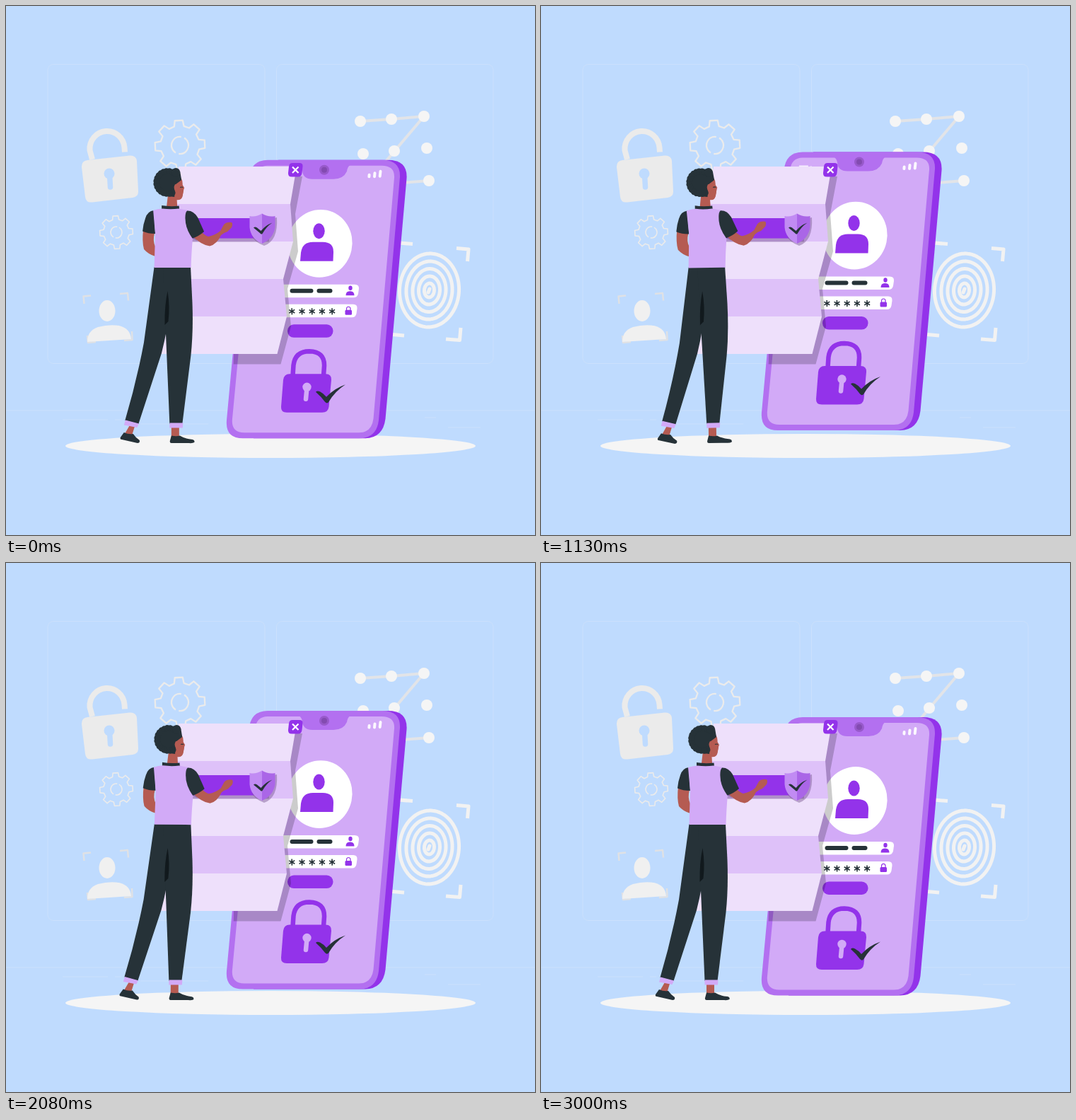
An HTML page for the animation above (3.04 s loop, 748 by 748 pixels).

```html
<!DOCTYPE html>
<html lang="en">
<head>
<meta charset="utf-8">
<title>Secure login</title>
<style>
  html, body { margin: 0; width: 100%; height: 100%; overflow: hidden; background: #bfdbfe; }
  svg { display: block; width: 100vw; height: 100vh; }
  .main { fill: #9333ea; }
  .mid { fill: #b370f0; }
  .pale { fill: #d2aaf7; }
  .dark { fill: #263238; }
  .skin { fill: #b55b52; }
  .white { fill: #fff; }
  .line { fill: none; stroke-linejoin: round; }
</style>
</head>
<body>
<svg viewBox="0 0 748 748">
  <defs>
    <clipPath id="overPhone">
      <path d="M346 212H570V620H319L322 492Z"/>
    </clipPath>
  </defs>

  <!-- backdrop -->
  <g class="line" stroke="#cbe0fc">
    <rect x="59" y="82.500" width="307" height="423" rx="8"/>
    <rect x="382.500" y="82.500" width="306.500" height="423" rx="8"/>
    <path d="M0 572H748M80 585H144M154 585H163M190 591H286M592 582H608M625 596H671"/>
  </g>

  <g id="padlock">
    <path class="line" d="M122 217L118.500 204A24.500 25 0 0 1 167.500 200L168 206.500" stroke="#ebebeb" stroke-width="8"/>
    <path d="M115 218L175 211.500Q184 211 185 219L187 262Q187.500 270 179 271L122 277.500Q113 278.500 112 270L107 228Q106.500 219 115 218Z" fill="#ebebeb"/>
    <circle cx="146" cy="237" r="7.500" fill="#bfdbfe"/>
    <path d="M146.500 238L147.500 256" stroke="#bfdbfe" stroke-width="7.500" stroke-linecap="round"/>
  </g>

  <g id="gears" class="line" stroke="#ebebeb"></g>

  <g id="faceScan">
    <path class="line" d="M110.500 421L109.500 410.500L120 409.500M161 407L172 406L173 416.500M115 466L116 476L127 475M178 460L178.500 472L167 473" stroke="#dfe1e5" stroke-width="2.500"/>
    <ellipse cx="143" cy="431" rx="11.500" ry="15" fill="#f0f0f0"/>
    <path d="M115 475Q115 459 130 454Q145 450 160 452Q176 456 177 471Z" fill="#f0f0f0"/>
  </g>

  <g id="unlockPattern">
    <path class="line" d="M501 163L545 160L591 156L508 254L598 247" stroke="#e2e4e8" stroke-width="4"/>
    <g id="dots" fill="#f5f5f5"></g>
  </g>

  <g id="fingerprint" class="line" stroke="#f2f2f2" stroke-width="5">
    <path d="M637 342.500L654 344L652.500 361M622 471L641.500 472.500L643 455M575 336.500L556 335M563 466L546 464.500"/>
  </g>

  <ellipse cx="374" cy="622" rx="290" ry="17" fill="#f5f5f5"/>

  <g id="phone">
    <path class="main" d="M385 218H540Q568 218 566.500 244L536.500 584Q533 611.500 507 611.500H350Z"/>
    <path class="mid" d="M370 218H532Q558 218 557 242L527 586Q524 611.500 499 611.500H335Q310 611.500 312 586L343.500 244Q346 218 370 218Z"/>
    <path class="pale" d="M370 226H531Q550 226 549 243L519.500 584Q517 603.500 499 603.500H337Q318 603.500 320 584L352 244Q354 226 370 226Z"/>
    <path class="mid" d="M414 225H487Q483 227 482 234Q477 245 463 245H433Q420 245 419 233Q418 227 414 225Z"/>
    <circle cx="450" cy="232" r="7" fill="#985acb"/>
    <circle cx="450" cy="232" r="4" fill="#834bb1"/>
    <g class="line" stroke="#fff" stroke-width="4" stroke-linecap="round" opacity=".93">
      <path d="M513.400 241.500L513.600 239M521 241.500L521.500 236.500M528.700 241L529.500 234"/>
    </g>
    <path class="white" d="M365 237H378L377 243H364ZM380.500 238H383L382 243H380Z" opacity=".8"/>

    <ellipse class="white" cx="444" cy="336" rx="45.500" ry="48" transform="rotate(12 444 336)"/>
    <ellipse class="main" cx="442.500" cy="318.500" rx="8.200" ry="11" />
    <path class="main" d="M416 361L417 349Q419 334 434 334H448Q463 334 463 348L462.500 361Z"/>

    <path class="white" d="M390 394H493Q499.500 394 499 400L498 407Q497 412.500 491 412.500H388Z"/>
    <path class="white" d="M388 422H491Q497 422 496.500 428L495.500 435Q494.500 440.500 489 440.500H386Z"/>
    <path class="line" d="M404.500 403H431.500M442.500 403H458.500" stroke="#263238" stroke-width="6" stroke-linecap="round"/>
    <ellipse class="main" cx="487" cy="399" rx="2.700" ry="3.300"/>
    <path class="main" d="M480.500 409.500Q480.500 403.500 486 403.500Q492.500 403 492.500 409.500Z"/>
    <path id="stars" class="line" stroke="#263238" stroke-width="1.600"/>
    <rect class="main" x="479.500" y="430" width="9.500" height="7" rx="1.500"/>
    <path class="line" d="M481.500 431V428.500A2.700 3 0 0 1 487 428.500V431" stroke="#9333ea" stroke-width="1.200"/>
    <rect class="main" x="398" y="450.500" width="64.500" height="18.500" rx="9"/>

    <path class="line" d="M405.500 523L406.500 508Q409 488.500 429 488.500Q450.500 489 450 509L449 523" stroke="#9333ea" stroke-width="6.500"/>
    <path class="main" d="M401 520.500H452Q460.500 520.500 460 529L456.500 567Q455.500 575 447 575H397Q388.500 575 389 567L392 529Q393 520.500 401 520.500Z"/>
    <circle class="pale" cx="425.500" cy="539" r="6.200"/>
    <path d="M425.500 540L424 556" stroke="#d2aaf7" stroke-width="6.500" stroke-linecap="round"/>
    <path class="dark" d="M438 546Q440 543.500 444 545.500Q449 548 453 553Q464 541 480 535.500Q465 545 456 560.500Q454 563 451 560Q446 553 438 546Z"/>
  </g>

  <!-- folded sheet -->
  <path clip-path="url(#overPhone)" d="M419 241L409 294L413 347L398 400L403 453L388.500 506.500H300V241Z" opacity=".2"/>
  <g id="folds"></g>
  <path d="M262 306H348L372 328V333.500H262Z" fill="#77558f" opacity=".45"/>
  <rect class="main" x="262" y="300" width="100" height="28.500"/>
  <path d="M365 296Q374 301 383 299Q385 332 365 339Q350 333 348 325Z" fill="#77558f" opacity=".45"/>
  <path d="M362 293.500Q353 299 344.500 297V313Q346 329 362 336Z" fill="#c18bf3"/>
  <path d="M362 293.500Q371 299 380.500 297V313Q378 329 362 336Z" fill="#aa66e7"/>
  <path class="dark" d="M350 313.500Q352 311.500 355 313.500L360.500 318Q367 310 376.500 306.500Q368 312 362.500 322Q361 323.500 359 321Z"/>
  <path class="main" d="M405 222H415Q420 222 419.500 227L418.500 236Q418 241.500 413 241.500H404Q398.500 241.500 399 236L400 227Q400.500 222 405 222Z"/>
  <path class="line" d="M405 227.500L413.500 236M413.500 227.500L405 236" stroke="#fff" stroke-width="2.200"/>

  <g id="person">
    <path class="skin" d="M194 316L210 321Q207 332 211 340V354Q201 351 195 344Q192 333 194 316Z"/>
    <path class="dark" d="M209 289Q200 290 197 300Q194 308 193 318.500Q201 322 211 322Z"/>

    <path class="skin" d="M175 593L182 595L178 608L168 605ZM234 595H245V610H234Z"/>
    <path class="dark" d="M167 603Q173 606 180 605Q184 611 189 614Q190 618 186 618L164 613Q161 613 162 610Z"/>
    <path class="dark" d="M234 607.500Q241 609 246 607.500Q253 612 264 613Q267.500 614 266.500 617Q264 618.500 259 618H234Q231.500 618 232 615Z"/>
    <path class="dark" d="M209.500 369H245L231 430Q229 455 220 491L187.500 591L168.500 586Q185 530 195 476Z"/>
    <path class="dark" d="M222 369H261L263.500 420Q265 460 261.500 494L249.500 591H231.500Z"/>
    <path d="M228.500 403Q224 424 224.500 451L229.500 446Q232 425 228.500 403Z" fill="#11191d"/>
    <path class="pale" d="M169 585.500L188 590.500L185.500 596L167 592.500ZM231.500 589.500H250.500L250 596.500H231.500Z"/>

    <path class="skin" d="M229 266L227 283Q235 288 242 283L241.500 274Q249 275 250 266L251 260L252 257L249.500 253Q250 247 247 243L232 246Z"/>
    <path class="skin" d="M241 274Q248 275.500 249.500 268L251 260L249.500 253L240 250Z"/>
    <path d="M246 256.500Q248 255.500 250 256.500" class="line" stroke="#263238" stroke-width="1.200"/>
    <g id="hair" class="dark"></g>
    <path class="skin" d="M239 252Q246 252 244 260Q242 264 239 262Q236 256 239 252Z"/>
    <path class="dark" d="M220 282Q232 284 244.500 282.500L245 288H220Z"/>

    <path class="pale" d="M208 289Q214 287 221 286.500Q233 288 244 286.500L257 289Q262 300 264 327Q262 350 261.500 370H209.500L211 323Z"/>
    <path d="M254 292Q253 312 263 328L270 332L265 318Z" fill="#77558f" opacity=".5"/>
    <path class="skin" d="M262 324L277 320Q282 325 286 326Q296 324 303 318L308 309Q312 305 319 306Q321 308 319 313L313 319Q307 321 304 324Q298 337 288 339.500Q276 338 262 324Z"/>
    <path class="dark" d="M256 289.500Q265 289 271 299L280 319Q272 326 263.500 328.500Q252 313 253.500 296Q254 291 256 289.500Z"/>
  </g>
</svg>

<script>
const $ = id => document.getElementById(id);
const add = (parent, tag, attrs) => {
  const node = document.createElementNS("http://www.w3.org/2000/svg", tag);
  for (const key in attrs) node.setAttribute(key, attrs[key]);
  $(parent).append(node);
};
const polar = (x, y, r, a) => `${x + r * Math.cos(a)} ${y + r * Math.sin(a)}`;

function gear(x, y, r, hole, width, teeth = 8) {
  const pitch = 2 * Math.PI / teeth;
  const points = [];
  for (let i = 0; i < teeth; i++) {
    const a = i * pitch - Math.PI / 2 - 0.05;
    for (const [k, d] of [[0.78, -0.32], [1, -0.2], [1, 0.2], [0.78, 0.32]])
      points.push(polar(x, y, r * k, a + d * pitch));
  }
  add("gears", "path", { d: `M${points.join("L")}Z`, "stroke-width": width });
  add("gears", "circle", {
    cx: x, cy: y, r: hole, "stroke-width": width, pathLength: 100,
    "stroke-dasharray": "44 6", transform: `rotate(-60 ${x} ${y})`
  });
}
gear(246, 197, 35.5, 12, 2.3);
gear(156, 320, 23.5, 8, 1.6);

for (const [x, y] of [[501, 163], [545, 160], [591, 156], [505, 209], [549, 205], [595, 201], [598, 247]])
  add("dots", "circle", { cx: x, cy: y, r: 8 });

// rx, ry, dash pattern in percent, starting turn
for (const [rx, ry, dash, turn] of [
  [42, 52, "42 3 22 3 27 3", 200],
  [32.5, 41, "30 5 38 4 18 5", 150],
  [23.5, 30.5, "46 6 40 8", 100],
  [15, 20, "62 9 20 9", 170],
  [7, 10, "70 30", 120]
]) {
  add("fingerprint", "ellipse", {
    rx: 1, ry: 1, pathLength: 100, "stroke-dasharray": dash, "stroke-linecap": "round",
    "vector-effect": "non-scaling-stroke",
    transform: `translate(598.5 402) rotate(4) scale(${rx} ${ry}) rotate(${turn})`
  });
}
add("fingerprint", "path", { d: "M599 400L597 405", "stroke-linecap": "round" });

let stars = "";
for (let i = 0; i < 5; i++)
  for (let k = 0; k < 6; k++)
    stars += `M${404.3 + i * 14.2} 432L${polar(404.3 + i * 14.2, 432, 4.6, k * Math.PI / 3 + 0.5)}`;
$("stars").setAttribute("d", stars);

const edge = [411, 402, 406, 392, 397, 383.5];
for (let i = 0; i < 5; i++) {
  const top = 227 + i * 53, end = top + 53.1, a = edge[i], b = edge[i + 1];
  add("folds", "path", {
    d: `M${a - 167} ${top}H${a}L${b} ${end}H${b - 165}Z`,
    fill: i % 2 ? "#dec1f9" : "#eee0fb"
  });
}

add("hair", "path", { d: "M214 238L232 231L246 234L248 246L240 252L238 270L220 268L212 256Z" });
for (let i = 0; i < 17; i++) {
  const a = 1.15 + i * 0.265;
  const [x, y] = polar(228.5, 249.5, 16, a).split(" ");
  add("hair", "circle", { cx: x, cy: y, r: 4.4 });
}
add("hair", "circle", { cx: 240, cy: 235, r: 6 });

const LOOP = 3040, STEP = 1000 / 24, CYCLE = 72;

// -1..1 triangle wave that starts at 0 and rises
const swing = p => p < 0.25 ? 4 * p : p < 0.75 ? 2 - 4 * p : 4 * p - 4;

function draw(now) {
  const step = Math.floor((now % LOOP + 5) / STEP);
  const p = Math.min((step + 0.5) / CYCLE, 1);
  const lift = 15 * (1 - Math.abs(2 * p - 1));
  $("phone").setAttribute("transform", `translate(0 ${-lift})`);
  $("person").setAttribute("transform", `rotate(${swing(p * 2 % 1)} 241 423)`);
}

const start = performance.now();
function tick() {
  draw(performance.now() - start);
  requestAnimationFrame(tick);
}
tick();
</script>
</body>
</html>
```
